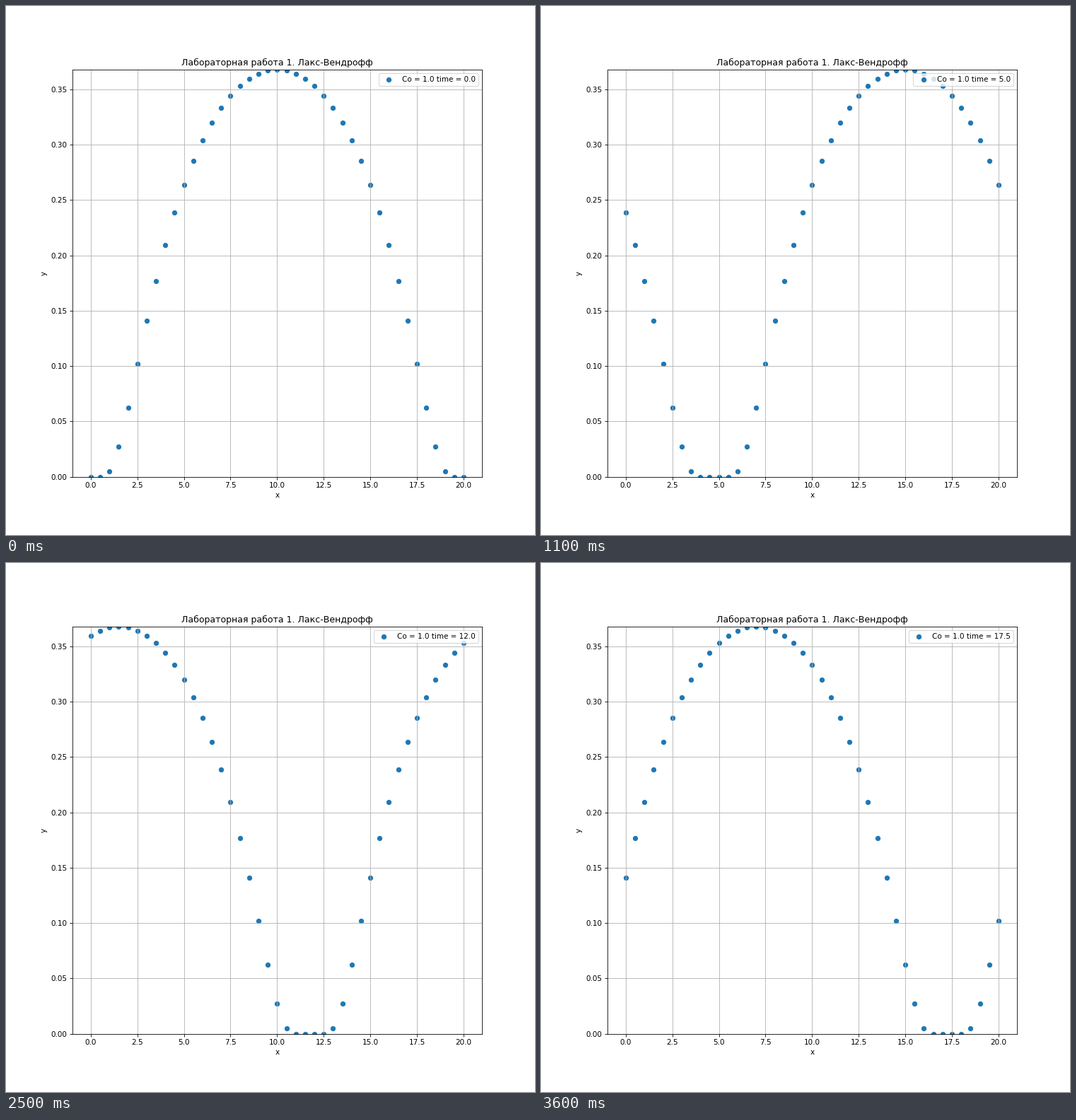
Write a matplotlib script that moves like this. It is 748x748 px and loops after 3700 ms.

```python
import numpy as np
import matplotlib.pyplot as plt
from matplotlib.animation import FuncAnimation

LENGTH, STEP, COURANT = 20.0, 0.5, 1.0
FRAMES, INTERVAL = 37, 100

x = np.arange(0, LENGTH + STEP / 2, STEP)


def bump(x):
    """Smooth bump on (0, LENGTH), zero at both ends."""
    gap = 1 - (2 * x / LENGTH - 1) ** 2
    y = np.zeros_like(x)
    inside = gap > 0
    y[inside] = np.exp(-1 / gap[inside])
    return y


start = bump(x)

fig, ax = plt.subplots(figsize=(10, 10), dpi=74.8)
dots = ax.scatter(x, start, label="Co")
ax.set_xlim(-1, 21)
ax.set_ylim(0, start.max())
ax.set_title("Лабораторная работа 1. Лакс-Вендрофф")
ax.set_xlabel("x")
ax.set_ylabel("y")
ax.grid()
label = ax.legend(loc="upper right").get_texts()[0]


def update(frame):
    # The initial state is held for two frames; at Co = 1 the scheme
    # moves the profile by exactly one cell per step.
    n = max(frame - 1, 0)
    dots.set_offsets(np.column_stack([x, np.roll(start, n)]))
    label.set_text(f"Co = {COURANT} time = {n * STEP * COURANT:.1f}")
    return dots, label


anim = FuncAnimation(fig, update, frames=FRAMES, interval=INTERVAL,
                     repeat=True, repeat_delay=0)
plt.show()
```
